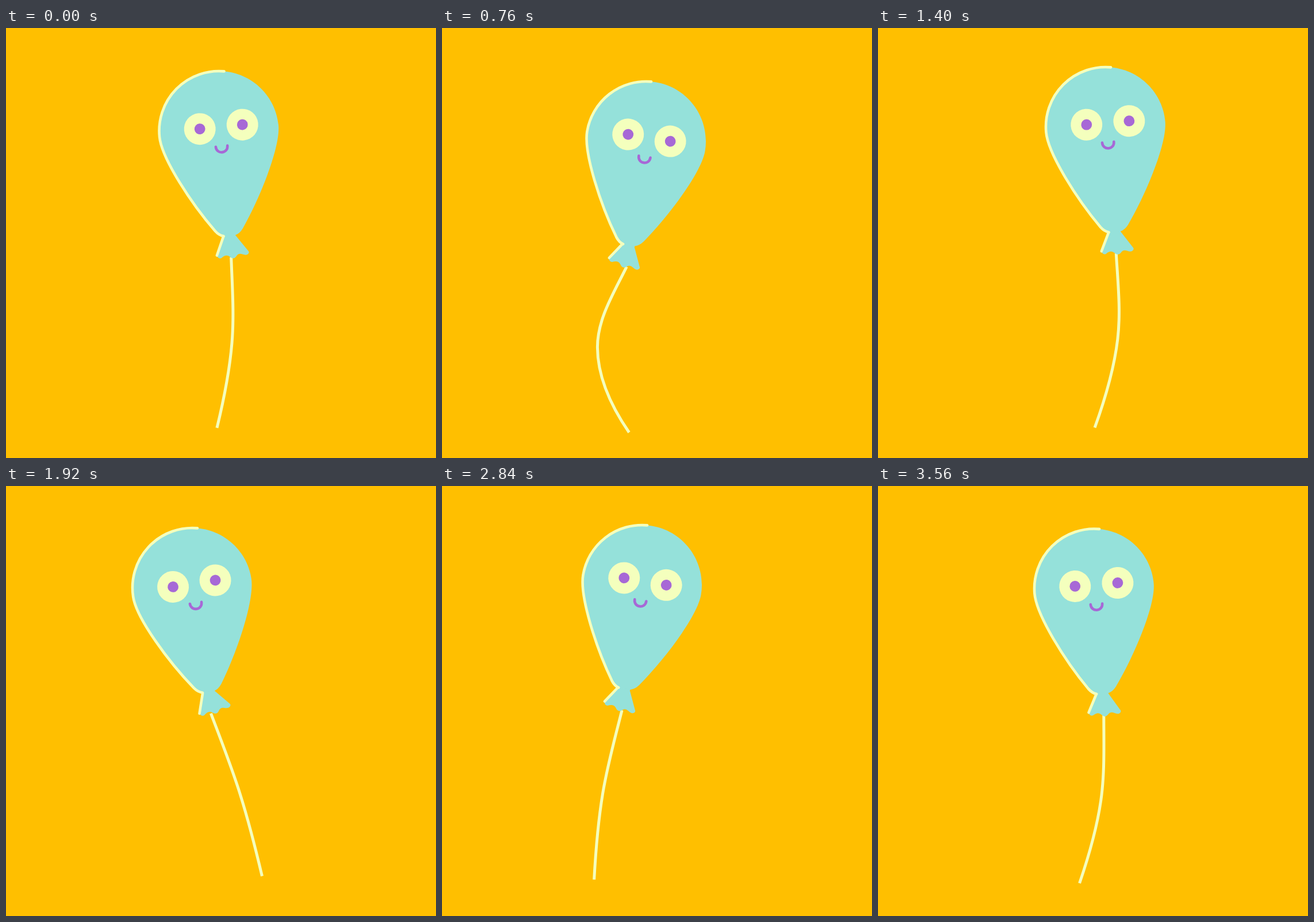
Recreate the animation shown at these times as an HTML page. Size 748 by 748 pixels, loop 3.6 s.

```html
<!DOCTYPE html>
<html lang="en">
<head>
<meta charset="utf-8">
<title>Balloon</title>
<style>
  html, body { margin: 0; width: 100%; height: 100%; overflow: hidden; background: #ffbf00; }
  svg { display: block; width: 100vw; height: 100vh; }
  .skin { fill: #95e1da; }
  .pale { fill: #f4ffbd; }
  .ink { fill: #a768d6; }
  .line { fill: none; stroke: #f4ffbd; stroke-width: 4.6; stroke-linecap: round; stroke-linejoin: round; }
  #string { stroke-width: 5; stroke-linecap: butt; }
  #mouth { fill: none; stroke: #a768d6; stroke-width: 4.6; stroke-linecap: round; }
</style>
</head>
<body>
<svg viewBox="0 0 748 748">
  <rect width="748" height="748" fill="#ffbf00"/>
  <path id="string" class="line"/>
  <g id="knot">
    <path class="skin" d="M-10-4L-10 0L-25 33Q-22 40-17 38Q-8 31-2 37Q4 43 9 37Q13 31 20 34Q27 37 30 34Q33 31 30 28L10 0L10-4Z"/>
    <path class="line" d="M-10.5 0L-24.5 33"/>
  </g>
  <g id="head">
    <path class="skin" d="M0-104C57.4-104 104-57.4 104 0C104 38 60 122 24 173Q18 181 10.5 183L-10.5 183Q-18 181-24 173C-60 122-104 38-104 0C-104-57.4-57.4-104 0-104Z"/>
    <path id="rim" class="line"/>
    <circle class="pale" cx="-32.8" cy="-6.7" r="27.5"/>
    <circle class="pale" cx="41.6" cy="-6.7" r="27.5"/>
    <circle class="ink" cx="-32.8" cy="-6.7" r="9.4"/>
    <circle class="ink" cx="41.6" cy="-6.7" r="9.4"/>
    <path id="mouth" d="M-8.4 27C-8.4 41 12 41 12 27"/>
  </g>
</svg>
<script>
const LOOP = 3600, STEP = 40, R = 104, NECK = 183, UPPER = 149;

// time, head x, head top, tilt, knot angle, upper and lower string angle, lower string length
const keys = [
  [0, 369.5, 73, -5.8, -4, 0.5, -10, 150],
  [200, 327, 74, -9.3, -13, 14, 10, 150],
  [430, 295, 75, -3, -4, 13, 27, 150],
  [600, 311, 82, 4.5, 10, -4, 30, 153],
  [760, 354, 91, 9.3, 20.8, -19.9, 20.4, 158],
  [960, 398, 82, 6.5, 18, -24, -8, 158],
  [1180, 411, 68, 0, 6, -14, -27, 158],
  [1400, 395, 66, -5, -2.3, 1, -14.5, 159],
  [1660, 364, 69, -8.5, -11, 15, 5, 153],
  [1920, 323, 71, -8.9, -14, 19.9, 15, 148],
  [2280, 295, 67, -1.9, -2, 11.6, 20.8, 152],
  [2560, 310, 66, 5, 11, 0, 12, 151],
  [2840, 347, 66, 9.6, 20.7, -13, -5.7, 150],
  [3160, 388, 70, 6, 14, -17.5, -25, 149],
  [3360, 391, 72.5, 0.8, 6, -12, -25, 148],
  [3560, 375, 72.5, -4.6, -0.5, -2, -14.5, 148]
];

const $ = id => document.getElementById(id);
const rad = a => a * Math.PI / 180;
const n = v => v.toFixed(2);
const pt = p => n(p[0]) + ' ' + n(p[1]);

function key(i) {
  const c = keys.length, turn = Math.floor(i / c);
  const k = keys[i - turn * c].slice();
  k[0] += turn * LOOP;
  return k;
}

// Smooth periodic curve through the keys
function pose(t) {
  let i = keys.length - 1;
  while (keys[i][0] > t) i--;
  const a = key(i - 1), b = key(i), c = key(i + 1), d = key(i + 2);
  const h = c[0] - b[0], u = (t - b[0]) / h, v = 1 - u;
  return b.map((p, j) => {
    const m0 = (c[j] - a[j]) / (c[0] - a[0]) * h;
    const m1 = (d[j] - b[j]) / (d[0] - b[0]) * h;
    return (1 + 2 * u) * v * v * p + u * v * v * m0 + u * u * (3 - 2 * u) * c[j] - u * u * v * m1;
  });
}

// Point at a distance from p, angle measured from straight down, positive to the right
function hang(p, angle, len) {
  return [p[0] + Math.sin(rad(angle)) * len, p[1] + Math.cos(rad(angle)) * len];
}

function stringPath(from, a, b, len) {
  const bend = b - a, mid = (a + b) / 2;
  const joint = hang(from, a, UPPER), end = hang(joint, b, len);
  return 'M' + pt(from) +
    'C' + [hang(from, a - bend * 0.15, UPPER / 3), hang(joint, mid, -UPPER / 3), joint].map(pt).join(' ') +
    'C' + [hang(joint, mid, len / 3), hang(end, b + bend * 0.35, -len / 3), end].map(pt).join(' ');
}

function draw(t) {
  const [, x, top, tilt, twist, a, b, len] = pose(t);
  const centre = [x + 1, top + 106];
  const neck = hang(centre, -tilt, NECK);
  const place = (p, angle) => `translate(${pt(p)}) rotate(${n(angle)})`;
  $('head').setAttribute('transform', place(centre, tilt));
  $('knot').setAttribute('transform', place(neck, twist));
  // The highlight always ends just right of the top, whatever the tilt
  const tip = hang([0, 0], 175 + tilt, R);
  $('rim').setAttribute('d', `M-10.5 183Q-18 181-24 173C-60 122-104 38-104 0A${R} ${R} 0 0 1 ${pt(tip)}`);
  $('string').setAttribute('d', stringPath(hang(neck, -tilt * 0.7, 38), a, b, len));
}

let start = null;
function tick(now) {
  if (start === null) start = now;
  draw(Math.floor(((now - start) % LOOP) / STEP) * STEP);
  requestAnimationFrame(tick);
}
draw(0);
requestAnimationFrame(tick);
</script>
</body>
</html>
```
